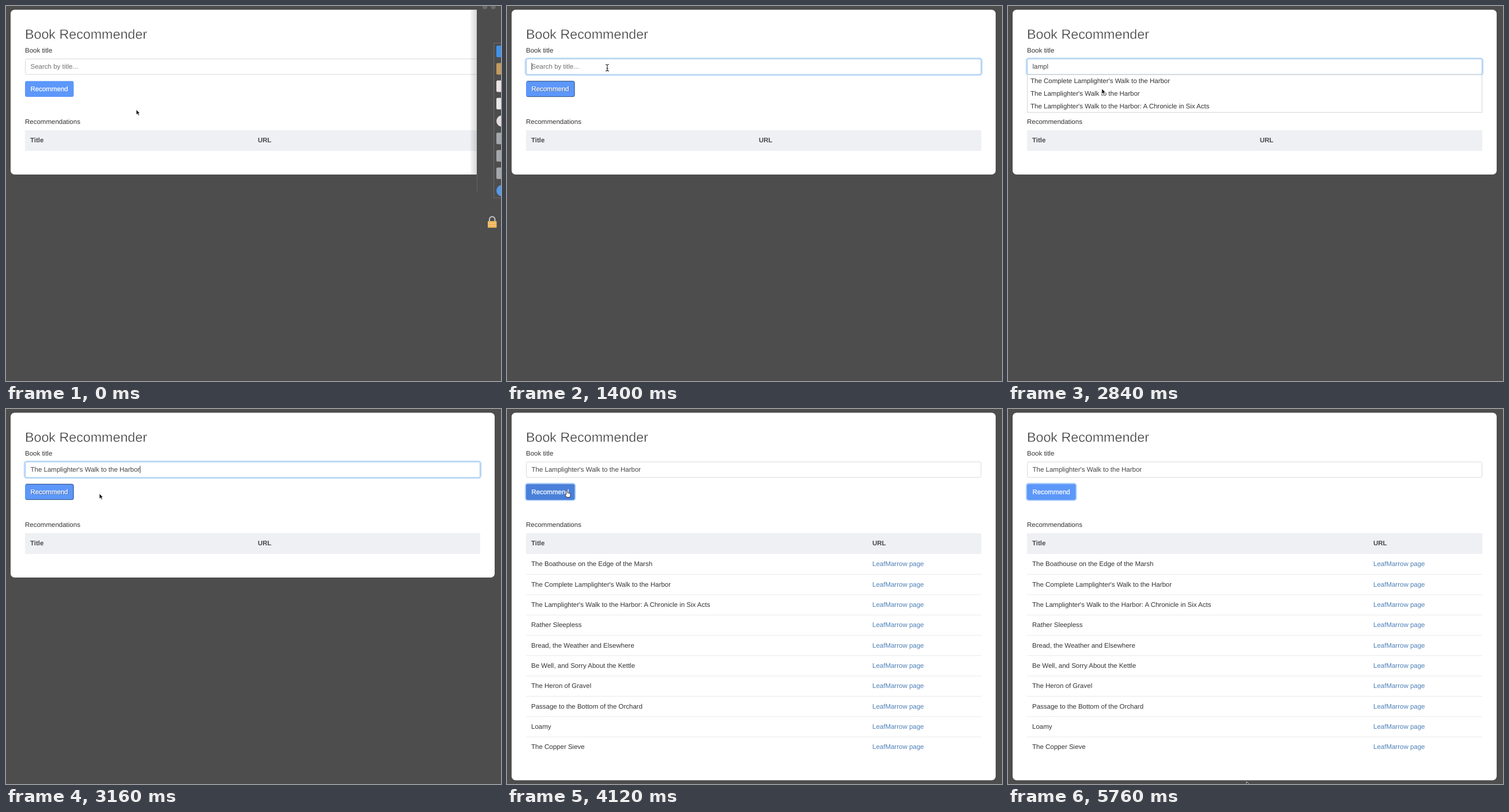
An HTML page for the animation above (5800 ms loop, 859x652 px).

```html
<!DOCTYPE html>
<html lang="en">
<head>
<meta charset="utf-8">
<title>Book Recommender</title>
<style>
  html, body { margin: 0; width: 100%; height: 100%; overflow: hidden; background: #4d4d4d; }
  svg { display: block; width: 859px; height: 652px; }
  text { font: 11.5px "Liberation Sans", Arial, sans-serif; fill: #333; white-space: pre; text-rendering: geometricPrecision; }
  .heading { font-size: 23.25px; fill: #383838; stroke: #fff; stroke-width: .45px; }
  .bold { font-weight: bold; fill: #484a4d; }
  .link { fill: #4f80b8; }
  .label { fill: #fff; stroke: #fff; stroke-width: .25px; }
</style>
</head>
<body>
<svg viewBox="0 0 859 652">
  <rect width="859" height="652" fill="#4d4d4d"/>
  <rect id="card" x="8" y="6.5" width="840" rx="7" fill="#fff"/>
  <text class="heading" x="33" y="57">Book Recommender</text>
  <text x="33" y="80.7">Book title</text>

  <rect id="inputRing" x="32" y="91" width="792" height="29" rx="4" fill="none" stroke="#c3def8" stroke-width="2.6"/>
  <rect id="input" x="33.5" y="92" width="789" height="27" rx="2.5" fill="#fff"/>
  <text id="value" x="42.5" y="109"></text>
  <rect id="caret" y="99" width="1" height="12.5" fill="#333"/>

  <rect id="buttonRing" x="32" y="129.7" width="86.3" height="29" rx="4" fill="none" stroke="#a9cdf8" stroke-width="2.2"/>
  <rect id="button" x="33" y="130.5" width="84.5" height="27.5" rx="3"/>
  <path id="buttonEdge" d="M35 130.7H114.5Q117 130.7 117 133.5V155Q117 157.6 114.5 157.6H35" fill="none" stroke="#37527f"/>
  <text id="labelShade" x="43.3" y="149" style="fill:#35598f">Recommend</text>
  <text class="label" x="42.5" y="148">Recommend</text>

  <text x="33" y="205">Recommendations</text>
  <rect x="33" y="216" width="790" height="36" fill="#eef0f4"/>
  <text class="bold" x="42" y="237.3">Title</text>
  <text class="bold" id="url" y="237.3">URL</text>
  <g id="rows"></g>

  <g id="menu">
    <rect x="33.5" y="119.5" width="789" height="65.5" fill="#fff" stroke="#d2d2d2"/>
  </g>

  <g id="desktop">
    <defs>
      <linearGradient id="shade"><stop stop-opacity=".03"/><stop offset="1" stop-opacity=".16"/></linearGradient>
    </defs>
    <rect x="806" y="6.5" width="11" height="286.5" fill="url(#shade)"/>
    <rect x="817" width="42" height="652" fill="#4d4d4d"/>
    <path d="M817.5 293V323" stroke="#656565"/>
    <g fill="#6c6c6c"><circle cx="831" cy="1.5" r="4"/><circle cx="845.5" cy="1.5" r="4"/></g>
    <rect x="846.5" y="64.5" width="20" height="269" fill="none" stroke="#6a6a6a"/>
    <g id="dock"></g>
    <path d="M839 375V371a4.7 4.7 0 0 1 9.4 0v4" fill="none" stroke="#c9c9c9" stroke-width="2"/>
    <rect x="836" y="374" width="15.5" height="11.5" rx="1" fill="#efb65c"/>
    <path d="M837 377.5H850.5M837 381.5H850.5" stroke="#f8d08a"/>
  </g>

  <g id="cursor">
    <path id="arrow" d="M0 0V9.3L2.2 7.3L3.8 10.7L5.4 10L3.9 6.7H6.6Z" fill="#111" stroke="#fff" stroke-width=".8"/>
    <path id="beam" d="M-3 -5.5Q0 -5.5 0 -3.5Q0 -5.5 3 -5.5M0 -4V4.5M-3 6Q0 6 0 4Q0 6 3 6M-1.5 1.5H1.5" fill="none" stroke="#222" stroke-width="1.1"/>
    <path id="hand" d="M-1 0Q.5 -1.2 1.2 .4V4Q2.4 3.2 3 4.3Q4.2 3.6 4.7 4.8Q6 4.6 6 6V8.5L5 11.6H-.3L-3 7.6Q-3.2 6 -1.2 6.8Z" fill="#fff" stroke="#222" stroke-width=".9"/>
  </g>
</svg>
<script>
const LOOP = 5800, FOCUS = 1120, TYPE = 1800, KEY_GAP = 80, MENU = 2440, PICK = 2960, CLICK = 3920, RESULT = 4120;
const QUERY = "lampl";
const PICKED = "The Lamplighter's Walk to the Harbor";
const COMPLETE = "The Complete Lamplighter's Walk to the Harbor";
const PARTS = PICKED + ": A Chronicle in Six Acts";
const BOOKS = [
  "The Boathouse on the Edge of the Marsh", COMPLETE, PARTS, "Rather Sleepless",
  "Bread, the Weather and Elsewhere", "Be Well, and Sorry About the Kettle",
  "The Heron of Gravel", "Passage to the Bottom of the Orchard", "Loamy", "The Copper Sieve"
];
// time, x, y
const PATH = [
  [0, 226, 180], [240, 226, 180], [1040, 174, 107], [2520, 174, 107], [2680, 169, 115], [2880, 162, 147],
  [3200, 162, 147], [3720, 104, 142], [4960, 104, 142], [5760, 414, 648], [LOOP, 414, 648]
];

const $ = id => document.getElementById(id);
const show = (id, on) => $(id).style.opacity = +on;
const clamp = v => Math.max(0, Math.min(1, v));
const fade = (t, from, ms = 150) => clamp((t - from) / ms);

function add(parent, tag, attrs, text = "") {
  const el = document.createElementNS("http://www.w3.org/2000/svg", tag);
  for (const k in attrs) el.setAttribute(k, attrs[k]);
  el.textContent = text;
  $(parent).append(el);
}

BOOKS.forEach((title, i) => {
  const y = 273.3 + 35.33 * i;
  add("rows", "text", { x: 42, y }, title);
  add("rows", "text", { x: 634, y, class: "link" }, "LeafMarrow page");
  if (i < BOOKS.length - 1) add("rows", "path", { d: `M33 ${y + 14.2}H823`, stroke: "#e8eaed" });
});
[COMPLETE, PICKED, PARTS].forEach((title, i) => add("menu", "text", { x: 39, y: 134.2 + 21.7 * i }, title));
["#3f93ef", "#c39a5c", "#ece4e4", "#e8e8e8", "#e5dddd", "#a5a8ab", "#a5a8ab", "#a5a8ab", "#5598e8"].forEach((fill, i) => {
  const round = i === 4 || i === 8;
  add("dock", "rect", { x: 851, y: 69 + 30.25 * i, width: 20, height: 20, rx: round ? 10 : 2, fill });
});

function pointer(t) {
  const i = PATH.findIndex(p => p[0] > t);
  const [t0, x0, y0] = PATH[i - 1], [t1, x1, y1] = PATH[i];
  const u = (t - t0) / (t1 - t0), e = u * u * (3 - 2 * u);
  return [x0 + (x1 - x0) * e, y0 + (y1 - y0) * e];
}

function mix(a, b, u) {
  return `rgb(${a.map((v, i) => Math.round(v + (b[i] - v) * u))})`;
}

function draw(t) {
  const done = t >= RESULT, focused = t >= FOCUS && t < CLICK;
  const keys = t < TYPE ? 0 : Math.min(QUERY.length, Math.floor((t - TYPE) / KEY_GAP) + 1);
  const value = t >= PICK ? PICKED : QUERY.slice(0, keys);

  $("card").setAttribute("height", done ? 639 : 286.5);
  $("url").setAttribute("x", done ? 634 : 437);
  show("rows", done);
  show("menu", t >= MENU && t < PICK);
  show("desktop", 1 - fade(t, 0, 240));

  const ring = fade(t, FOCUS) * (1 - fade(t, CLICK));
  show("inputRing", ring);
  $("input").setAttribute("stroke", mix([217, 217, 217], [156, 197, 236], ring));
  $("value").textContent = value || "Search by title...";
  $("value").style.fill = value ? "#444" : "#707070";

  const lastEdit = t >= PICK ? PICK : keys ? TYPE + KEY_GAP * (keys - 1) : FOCUS;
  show("caret", focused && (t - lastEdit) % 1060 < 530);
  $("caret").setAttribute("x", 42.5 + (value ? $("value").getComputedTextLength() : 0));

  const [x, y] = pointer(t);
  const overButton = t > PICK && x > 33 && x < 117.5 && y > 130 && y < 158;
  const overInput = y > 92 && y < 119;
  $("button").setAttribute("fill", overButton ? "#4a80d9" : "#5c97fa");
  show("buttonRing", fade(t, CLICK, 220));
  show("buttonEdge", focused);
  show("labelShade", focused);

  $("cursor").setAttribute("transform", `translate(${x} ${y})`);
  show("hand", overButton);
  show("beam", overInput);
  show("arrow", !overButton && !overInput);
}

function tick() {
  draw(Math.floor(performance.now() % LOOP / 40) * 40);
  requestAnimationFrame(tick);
}
tick();
</script>
</body>
</html>
```
